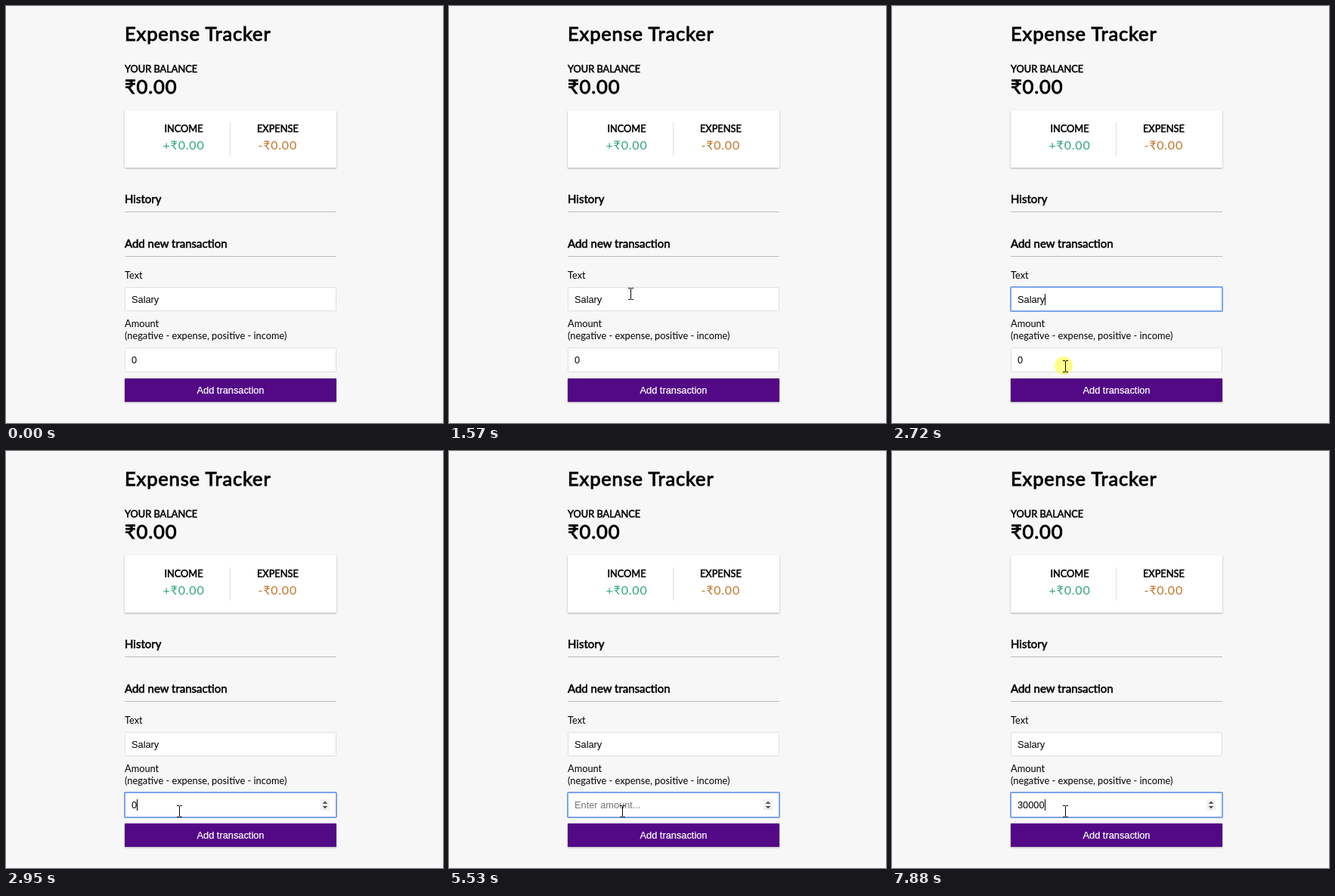
An HTML page for the animation above (8 s loop, 578 px wide and 552 px high).

```html
<!DOCTYPE html>
<html lang="en">
<head>
<meta charset="utf-8">
<title>Expense Tracker</title>
<style>
  html, body { margin: 0; width: 100%; height: 100%; overflow: hidden; background: #f7f7f7; }
  svg { display: block; }
  text { font: 12.8px Lato, sans-serif; white-space: pre; }
  .bold { stroke: #000; stroke-width: .52px; }
  .h1 { font-size: 25.6px; letter-spacing: .8px; stroke-width: .9px; }
  .h3 { font-size: 14.976px; stroke-width: .59px; }
  .money { font-size: 16px; letter-spacing: .8px; }
  .mid { text-anchor: middle; }
  .ui { font-family: "Liberation Sans", Arial, sans-serif; }
  .box { fill: #fff; stroke: #dedede; }
  .ring { fill: none; stroke: #7ba4ec; stroke-width: 2; }
  .raised { filter: drop-shadow(0 1px 1px rgba(0,0,0,.3)); }
</style>
</head>
<body>
<svg width="578" height="552" viewBox="0 0 578 552">
  <text class="bold h1" x="157" y="46">Expense Tracker</text>
  <text class="bold" x="157" y="88">YOUR BALANCE</text>
  <text class="bold h1" x="157" y="116">₹0.00</text>

  <rect class="raised" x="157" y="138" width="280" height="76" fill="#fff"/>
  <path d="M296.5 154v44" stroke="#dedede"/>
  <text class="bold mid" x="235" y="167">INCOME</text>
  <text class="money mid" x="235" y="190" fill="#2fa67c">+₹0.00</text>
  <text class="bold mid" x="359.4" y="167">EXPENSE</text>
  <text class="money mid" x="359.2" y="190" fill="#c0762a">-₹0.00</text>

  <text class="bold h3" x="157" y="261">History</text>
  <text class="bold h3" x="157" y="320">Add new transaction</text>
  <path d="M157 272.5h280M157 331.5h280" stroke="#bbb"/>

  <text x="157" y="361">Text</text>
  <rect class="box" x="157.5" y="372.5" width="279" height="31" rx="1"/>
  <text class="ui" x="166" y="393">Salary</text>
  <text x="157" y="425">Amount</text>
  <text x="157" y="441">(negative - expense, positive - income)</text>
  <rect class="box" x="157.5" y="452.5" width="279" height="32" rx="1"/>
  <text class="ui" id="amount" x="166" y="473"></text>

  <g id="spinner">
    <path d="M416 461h12v15h-12z" fill="#f1f1f1"/>
    <path d="M418.7 467h6.6l-3.3-3.6zM418.7 470h6.6l-3.3 3.6z" fill="#505050"/>
  </g>
  <rect class="ring" id="textRing" x="157" y="372" width="280" height="32" rx="1"/>
  <rect class="ring" id="amountRing" x="157" y="452" width="280" height="33" rx="1"/>
  <rect id="caret" width="1" height="15"/>

  <rect class="raised" x="157" y="493" width="280" height="31" fill="#530886"/>
  <text class="ui mid" x="297" y="513" fill="#fff" stroke="#fff" stroke-width=".25">Add transaction</text>

  <g id="pointer">
    <circle id="halo" cx="-2" cy="-1" r="12" fill="#ff0" fill-opacity=".47"/>
    <path id="beam" d="M-3-8h3v1h1v-1h3v1h-3v14h3v1h-3v-1h-1v1h-3v-1h3v-14h-3z" shape-rendering="crispEdges"/>
    <path id="arrow" d="M.5.5v16l3.7-3.6 2.6 5.6 2.4-1-2.5-5.6h5z" fill="#fff" stroke="#000"/>
    <g id="hand" stroke="#000" stroke-linejoin="round">
      <path d="M-1.5 14V2Q-1.5.5 0 .5T1.5 2v6q1.5-1.4 3 .3 1.6-1.1 2.9.6 2.6-.8 3.1 1.6v5q0 2-1.5 4.5v3.5h-8.500v-2.500q-3.500-3-6-7.500-.9-2.500 1-2.500 1.500 0 3 3z" fill="#fff"/>
      <path d="M1.500 8v4M4.500 8.500v3.500M7.500 9v3" fill="none"/>
    </g>
  </g>
</svg>
<script>
const LOOP = 8000, TICK = 76.7, ENTER = 716;
const $ = id => document.getElementById(id);
const show = (id, on) => $(id).setAttribute("display", on ? "inline" : "none");
const place = (id, x, y) => $(id).setAttribute("transform", `translate(${x} ${y})`);
const within = (t, spans) => spans.some(([a, b]) => t >= a && t < b);

// pointer path: tick, x, y
const path = [[0, 308, 546], [2, 293, 513], [6, 261, 430], [10, 240, 383],
              [11, 240, 381], [20, 240, 381], [25, 229, 477]];
const keyTimes = [6080, 6310, 6460, 6630, 6780];
const blinks = [[2260, 2800], [2950, 3410], [3960, 4510], [5060, 5530], [6080, 7330], [7880, LOOP]];

function pointerAt(tick) {
  const i = path.findIndex(p => p[0] > tick);
  if (i < 0) return path.at(-1).slice(1);
  const [a, x, y] = path[i - 1], [b, u, v] = path[i], f = (tick - a) / (b - a);
  return [Math.round(x + (u - x) * f), Math.round(y + (v - y) * f)];
}

function shapeAt(y) {
  if (y >= 493 && y < 524) return "hand";
  return (y >= 372 && y < 404) || (y >= 452 && y < 485) ? "beam" : "arrow";
}

function draw(t) {
  const tick = Math.floor((t - ENTER) / TICK);
  show("pointer", tick >= 0);
  if (tick >= 0) {
    const [x, y] = pointerAt(tick), shape = shapeAt(y);
    place("pointer", x, y);
    for (const s of ["beam", "arrow", "hand"]) show(s, s === shape);
  }
  show("halo", within(t, [[1950, 2030], [2720, 2800]]));

  const onAmount = t >= 2950;
  show("textRing", t >= 2260 && !onAmount);
  show("amountRing", onAmount);
  show("spinner", within(t, [[1110, 1260], [2870, LOOP]]));

  const typed = keyTimes.filter(k => t >= k).length;
  const value = t < 5060 ? "0" : "30000".slice(0, typed);
  const hint = !value && t >= 5130;
  $("amount").textContent = hint ? "Enter amount..." : value;
  $("amount").setAttribute("fill", hint ? "#757575" : "#000");

  show("caret", within(t, blinks));
  if (onAmount) place("caret", Math.round(166 + value.length * 7.12), 461);
  else place("caret", 202, 381);
}

function frame() {
  draw(performance.now() % LOOP);
  requestAnimationFrame(frame);
}
frame();
</script>
</body>
</html>
```
